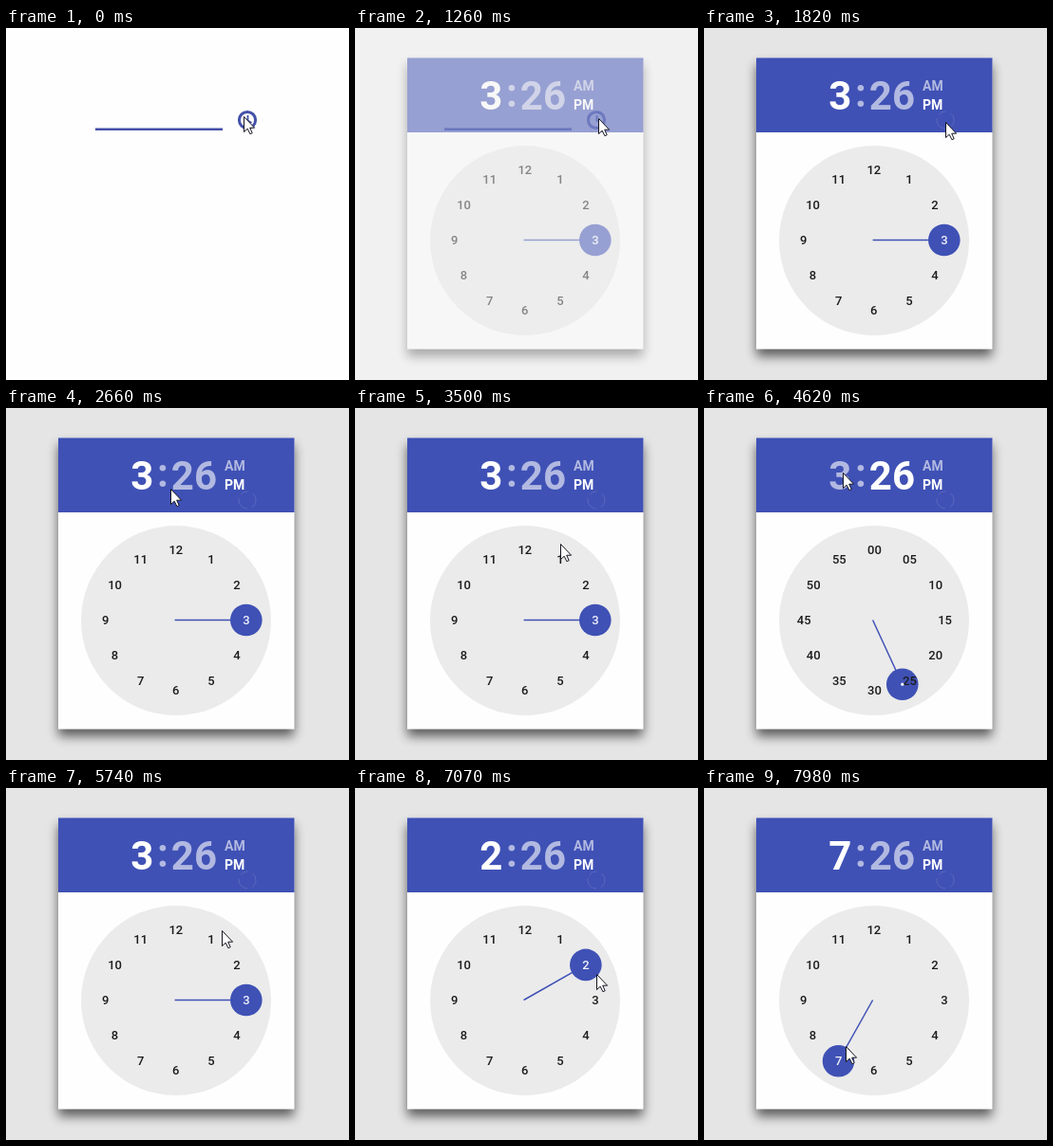
An HTML page that plays this animation: 361 by 371 pixels, repeating every 8000 ms.

```html
<!DOCTYPE html>
<html lang="en">
<head>
<meta charset="utf-8">
<title>Time picker</title>
<style>
html, body { margin: 0; width: 100%; height: 100%; overflow: hidden; background: #fff; }
svg { display: block; width: 100vw; height: 100vh; }
text { font-family: Roboto, sans-serif; fill: #fff; }
.big { font-size: 42px; font-weight: 700; }
.half { font-size: 14px; font-weight: 700; }
.num { font-size: 13px; font-weight: 500; text-anchor: middle; fill: #1c1c1c; }
.dim { fill: #b2b9e1; }
</style>
</head>
<body>
<svg viewBox="0 0 361 371">
  <defs>
    <filter id="blur" x="-20%" y="-20%" width="140%" height="140%">
      <feGaussianBlur stdDeviation="6"/>
    </filter>
  </defs>
  <rect width="361" height="371" fill="#fefefe"/>
  <path d="M94 106.7H228" stroke="#4451a8" stroke-width="2.6"/>
  <rect id="caret" x="94" y="85" width="1.5" height="18" fill="#333"/>
  <g fill="none" stroke="#4451a8">
    <circle cx="254" cy="97" r="8.6" stroke-width="3"/>
    <path d="M254.5 92V97.5L258.5 100" stroke-width="1.8"/>
  </g>
  <rect id="shade" width="361" height="371" fill="#e5e5e5"/>
  <g id="dialog">
    <rect x="55" y="39" width="248" height="307" fill="#000" opacity=".6" filter="url(#blur)"/>
    <rect x="55" y="31.5" width="248.5" height="307" fill="#fefefe"/>
    <rect x="55" y="31.5" width="248.5" height="78.5" fill="#3f51b5"/>
    <circle cx="254" cy="97" r="9" fill="none" stroke="#7f8bc4" stroke-dasharray="9 5 16 4" opacity=".4"/>
    <text id="hour" class="big" x="131.3" y="86">3</text>
    <text class="big dim" x="159" y="83">:</text>
    <text id="minute" class="big" x="173.8" y="86">26</text>
    <text class="half dim" x="230" y="66">AM</text>
    <text class="half" x="230" y="86">PM</text>
    <circle cx="179" cy="224" r="100" fill="#ebebeb"/>
    <g id="hours"></g>
    <g id="minutes"></g>
  </g>
  <path id="cursor" d="M.5 .5V16.6L4.2 13.2L6.9 18.7L9.2 17.7L6.7 12.2H11.6Z" fill="#fff" stroke="#15151f"/>
</svg>
<script>
const LOOP = 8000, STEP = 70, CX = 178.6, CY = 223.5, R = 74.2;
const NS = 'http://www.w3.org/2000/svg';
const $ = id => document.getElementById(id);

// Pointer strokes: start, end, x, y, sideways bend
const home = [250, 93];
const strokes = [
  [0, 140, 257, 93, 0],
  [210, 420, 256, 95, 0],
  [1750, 2590, 175, 82, -58],
  [2590, 3430, 216, 143, 50],
  [3500, 3710, 196, 71, 0],
  [4270, 4620, 146, 68, 0],
  [4830, 5460, 210, 75, 0],
  [5460, 5740, 227, 150, 0],
  [5740, 6020, 226, 163, 0]
];
const PRESS = 6160, DRAG = 6510;

const ramp = (t, start, end) => Math.min(1, Math.max(0, (t - start) / (end - start)));
const smooth = u => u * u * (3 - 2 * u);

function polar(deg, r = R) {
  const a = deg * Math.PI / 180;
  return [CX + r * Math.sin(a), CY - r * Math.cos(a)];
}

function pointer(t) {
  if (t >= DRAG) {
    // The drag sweeps round the dial and speeds up
    const u = ramp(t, DRAG, 7980) ** 1.76;
    return polar(38 + 173 * u, 77 - 20 * u + 13 * Math.sin(Math.PI * u));
  }
  let [x, y] = home;
  for (const [start, end, toX, toY, bend] of strokes) {
    if (t < start) break;
    const u = smooth(ramp(t, start, end));
    const dx = toX - x, dy = toY - y;
    const side = 4 * u * (1 - u) * bend / Math.hypot(dx, dy);
    x += dx * u - dy * side;
    y += dy * u + dx * side;
  }
  return [x, y];
}

function add(parent, tag, attrs, label = '') {
  const el = document.createElementNS(NS, tag);
  for (const key in attrs) el.setAttribute(key, attrs[key]);
  el.textContent = label;
  return parent.appendChild(el);
}

function makeFace(group, shift, label) {
  const hand = add(group, 'path', { stroke: '#3f51b5', 'stroke-width': 1.5 });
  const knob = add(group, 'circle', { r: 16.8, fill: '#3f51b5' });
  const labels = [];
  for (let i = 1; i <= 12; i++) {
    const [x, y] = polar(i * 30);
    labels[i] = add(group, 'text', { class: 'num', x: x + shift, y: y + 4.7 }, label(i));
  }
  return { group, hand, knob, labels };
}

function place(circle, [x, y]) {
  circle.setAttribute('cx', x);
  circle.setAttribute('cy', y);
}

function point(face, deg) {
  const end = polar(deg);
  face.hand.setAttribute('d', `M${CX - 1} ${CY}L${end}`);
  place(face.knob, end);
  face.labels.forEach((el, i) => el.style.fill = i * 30 === deg ? '#f0f1fa' : '');
}

const hours = makeFace($('hours'), 0.2, i => i);
const minutes = makeFace($('minutes'), 0.8, i => String(i * 5 % 60).padStart(2, '0'));
point(minutes, 26 * 6);
place(add(minutes.group, 'circle', { r: 1.7, fill: '#e8eaf6' }), polar(26 * 6));

function draw(time) {
  const t = Math.floor(time % LOOP / STEP) * STEP;
  const [x, y] = pointer(t).map(Math.round);
  $('cursor').setAttribute('transform', `translate(${x} ${y})`);
  $('caret').setAttribute('opacity', t >= 280 && t < 770 ? 1 : 0);

  const open = ramp(t, 1050, 1470);
  $('shade').setAttribute('opacity', open);
  $('dialog').setAttribute('opacity', open);

  const onMinutes = t >= 3850 && t < 4900;
  const mix = ramp(t, 3780, 4130) - ramp(t, 4830, 5180);
  hours.group.setAttribute('opacity', 1 - mix);
  minutes.group.setAttribute('opacity', mix);
  $('hour').classList.toggle('dim', onMinutes);
  $('minute').classList.toggle('dim', !onMinutes);

  // While pressed, the hand snaps to the hour nearest the pointer
  let hour = 3;
  if (t >= PRESS) {
    const deg = Math.atan2(x - CX, CY - y) * 180 / Math.PI;
    hour = Math.round((deg + 360) % 360 / 30) || 12;
  }
  $('hour').textContent = hour;
  point(hours, hour * 30);
}

const start = performance.now();
function tick() {
  draw(performance.now() - start);
  requestAnimationFrame(tick);
}
tick();
</script>
</body>
</html>
```
